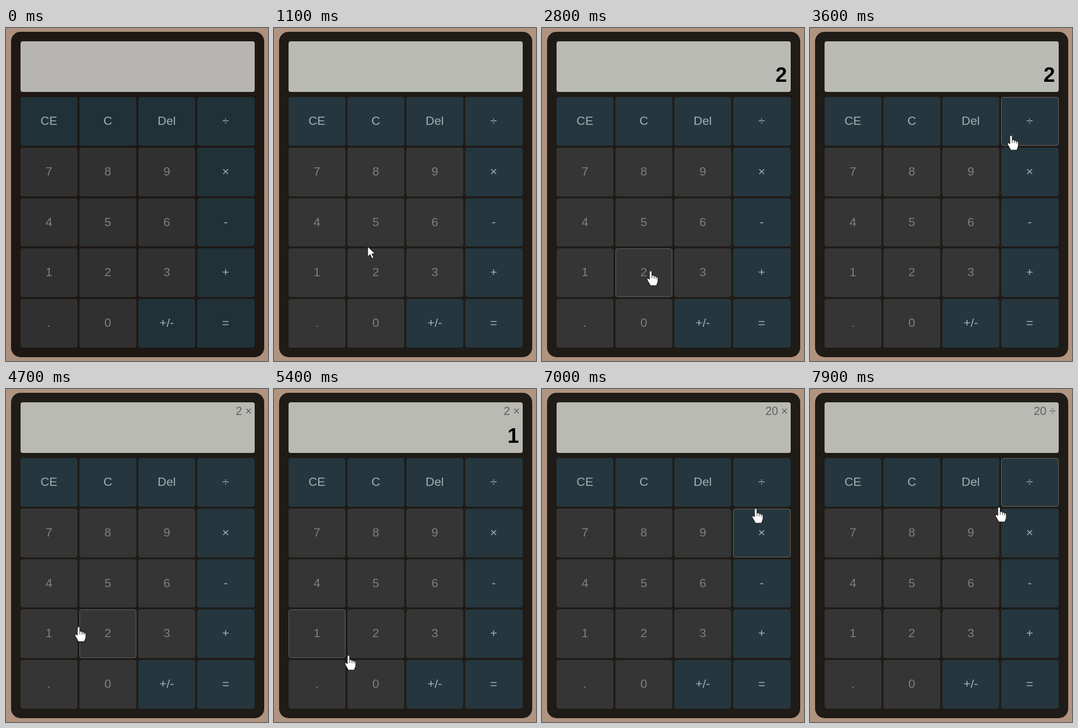
Recreate the animation shown at these times as an HTML page. Size 414 by 526 pixels, loop 8 s.

```html
<!DOCTYPE html>
<html lang="en">
<head>
<meta charset="utf-8">
<title>Calculator</title>
<style>
html, body { margin: 0; width: 100%; height: 100%; overflow: hidden; }
svg { display: block; width: 414px; height: 526px; }
text { font-family: "Liberation Sans", Arial, sans-serif; text-anchor: end; }
#keys text { font-size: 19.2px; text-anchor: middle; fill: #808080; }
#keys .op text { fill: #a2b0b4; }
#back { fill: var(--back); }
#body { fill: var(--body); }
#screen { fill: var(--screen); }
#keys rect { fill: var(--digit); }
#keys .op rect { fill: var(--op); }
#ring { fill: none; stroke: #5b5b5e; }
#ring.op { stroke: #66605a; }
#arrow, #hand { fill: #fff; stroke: #111; }
</style>
</head>
<body>
<svg id="stage" viewBox="0 0 414 526">
  <rect id="back" width="414" height="526"/>
  <rect id="body" x="8" y="6" width="400" height="514" rx="15"/>
  <rect id="screen" x="23" y="21" width="370" height="80" rx="3.5"/>
  <text id="small" x="388.5" y="41" font-size="18" fill="#625f60"></text>
  <text id="main" x="387" y="85" font-size="32.6" font-weight="bold"></text>
  <g id="keys"></g>
  <rect id="ring" rx="3.5"/>
  <path id="arrow" d="M0 0V16.5L3.9 12.8L6.8 19.3L9.6 18L6.8 11.8H12Z"/>
  <g id="hand">
    <path d="M-2.2 1.5C-2.2 -.7 1.7 -.7 1.7 1.5V7C3 6.1 4.9 6.6 5.2 8C6.5 7.3 8 7.9 8.3 9.1C9.9 8.6 11.2 9.5 11.2 11V16C11.2 18.5 9.5 19.5 9.2 23H-1.2C-1.5 20.2 -4.2 17.5 -5.8 13.8C-6.8 11.4 -4.4 10.2 -2.2 13Z"/>
    <path d="M1.7 7V11.5M5.2 8V12M8.3 9.1V12.5" stroke-width=".8"/>
  </g>
</svg>
<script>
const LOOP = 8000, STEP = 100, FADE = 900;
const MS_PER_PX = 1.8, HOVER_LAG = 50;
const LEFT = 23, TOP = 109, COL = 93.1, ROW = 79.8, KEY_W = 90.25, KEY_H = 76.8;
const $ = id => document.getElementById(id);

const labels = "CE C Del ÷ 7 8 9 × 4 5 6 - 1 2 3 + . 0 +/- =".split(" ");
const isOp = i => i < 4 || i % 4 === 3 || labels[i] === "+/-";

// each surface fades from its first tone to its second
const tones = {
  back: ["#ab917e", "#b09480"],
  body: ["#1e1714", "#1f1b17"],
  screen: ["#b6b5b3", "#b8bab3"],
  digit: ["#303030", "#353535"],
  op: ["#203138", "#25363e"]
};

// pointer stops: key, offset within it, arrival time, press time
const stops = [
  ["5", 32, 76.4, 1000],
  ["5", 70, 66, 1700],
  ["2", 79, 29, 1850],
  ["2", 56, 36, 2500, 2800],
  ["÷", 16, 61, 3400],
  ["×", 26, 56, 3800, 4100],
  ["1", 56, 50, 4900, 5100],
  ["0", 34, 12, 5500, 5600],
  ["=", 30, 37, 6000, 6200],
  ["÷", 36, 41, 7200, 7500],
  ["÷", -3, 78, 7900]
].map(([key, dx, dy, at, press]) => {
  const b = origin(labels.indexOf(key));
  return { key, x: b.x + dx, y: b.y + dy, at, press };
});

function origin(i) {
  return { x: LEFT + COL * (i % 4), y: TOP + ROW * Math.floor(i / 4) };
}

// key rectangle snapped to whole pixels
function box(i) {
  const { x, y } = origin(i), rx = Math.round(x), ry = Math.round(y);
  return { x: rx, y: ry, width: Math.round(x + KEY_W) - rx, height: Math.round(y + KEY_H) - ry };
}

function set(el, attrs) {
  for (const k in attrs) el.setAttribute(k, attrs[k]);
  return el;
}

function add(tag, attrs, parent) {
  return parent.appendChild(set(document.createElementNS("http://www.w3.org/2000/svg", tag), attrs));
}

labels.forEach((label, i) => {
  const g = add("g", { class: isOp(i) ? "op" : "" }, $("keys"));
  const { x, y } = origin(i);
  add("rect", { ...box(i), rx: 4 }, g);
  add("text", { x: x + 44.8, y: y + 43.9 }, g).textContent = label;
});

// run the calculator over every press up to time t
function calculate(t) {
  let total = "", op = "", entry = "";
  for (const { key, press } of stops) {
    if (!(press <= t)) continue;
    if (/\d/.test(key)) { entry += key; continue; }
    if (entry) total = op === "×" ? total * entry : entry;
    entry = "";
    if (key !== "=") op = key;
  }
  return { small: op && `${total} ${op}`, main: entry };
}

function pointer(t) {
  let p = stops[0];
  for (const s of stops.slice(1)) {
    const u = 1 - (s.at - t) / (MS_PER_PX * Math.hypot(s.x - p.x, s.y - p.y));
    if (u <= 0) break;
    const k = 1 - (1 - Math.min(1, u)) ** 2;
    p = { x: p.x + (s.x - p.x) * k, y: p.y + (s.y - p.y) * k };
    if (u < 1) break;
  }
  return p;
}

function show(id, on) { $(id).setAttribute("visibility", on ? "visible" : "hidden"); }

function draw(t) {
  const k = Math.min(1, t / FADE) * 100;
  for (const name in tones) {
    const [from, to] = tones[name];
    $("stage").style.setProperty("--" + name, `color-mix(in srgb, ${from}, ${to} ${k}%)`);
  }

  const { small, main } = calculate(t);
  $("small").textContent = small;
  $("main").textContent = main;

  const tip = pointer(t), hot = pointer(t - HOVER_LAG);
  const col = Math.floor((hot.x - LEFT + 3) / COL), row = Math.floor((hot.y - TOP) / ROW);
  const seen = t >= stops[0].at, over = hot.y - TOP - row * ROW < 76;
  show("arrow", seen && !over);
  show("hand", seen && over);
  show("ring", seen && over);

  const transform = `translate(${Math.round(tip.x)} ${Math.round(tip.y)})`;
  set($("arrow"), { transform });
  set($("hand"), { transform });
  const i = row * 4 + col, b = box(i);
  set($("ring"), {
    x: b.x + .5, y: b.y + .5, width: b.width - 1, height: b.height - 1,
    class: isOp(i) ? "op" : ""
  });
}

const start = performance.now();
function tick() {
  const t = (performance.now() - start) % LOOP;
  draw(Math.floor(t / STEP) * STEP);
  requestAnimationFrame(tick);
}
tick();
</script>
</body>
</html>
```
